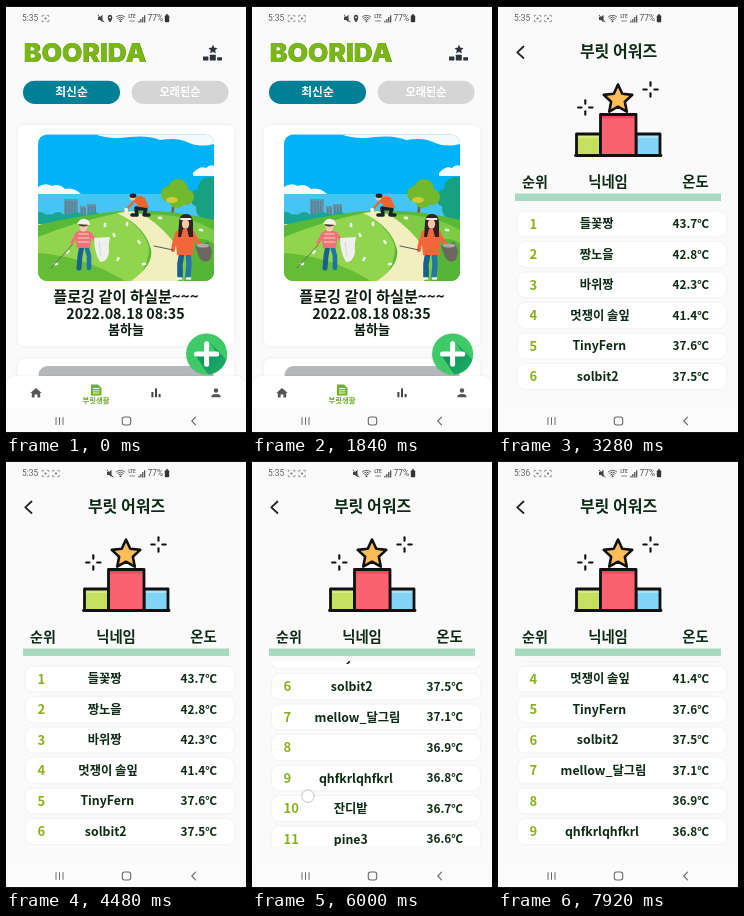
Recreate the animation shown at these times as an HTML page with a canvas. Size 240 by 427 pixels, loop 8000 ms.

```html
<!DOCTYPE html>
<html lang="ko">
<head>
<meta charset="utf-8">
<style>
html, body { margin: 0; width: 100%; height: 100%; overflow: hidden; background: #fafafa; }
canvas { display: block; width: 100vw; height: 100vh; }
</style>
</head>
<body>
<canvas id="stage"></canvas>
<script>
const W = 240, H = 427, LOOP = 8000;
const canvas = document.getElementById('stage');
const g = canvas.getContext('2d');
const FONT = '"Noto Sans CJK KR", "Noto Sans CJK", "Noto Sans", sans-serif';
const INK = '#0d2a14', DARK = '#2b333b', GREY = '#666a6e';

const ROWS = [
  ['들꽃짱', 43.7], ['짱노을', 42.8], ['바위짱', 42.3], ['멋쟁이 솔잎', 41.4],
  ['TinyFern', 37.6], ['solbit2', 37.5], ['mellow_달그림', 37.1], ['', 36.9],
  ['qhfkrlqhfkrl', 36.8], ['잔디밭', 36.7], ['pine3', 36.6], ['mellow_별이슬', 36.5],
  ['dewdrop', 36.5], ['cloud2', 36.5], ['ooo', 36.5], ['qhfkrl', 36.5],
  ['mellow_솔바람', 36.5], ['Moss', 36.5], ['mellow_은모래', 36.5]
];
const PITCH = 30.5;

// Each swipe: touch down, move start, rest time, distance, finger x and y
const SWIPES = [
  { down: 5040, from: 5120, to: 5840, dist: 142, x: 54, y: 335 },
  { down: 5920, from: 5960, to: 6720, dist: 256.5, x: 56, y: 338 },
  { down: 7200, from: 7240, to: 7920, dist: -307, x: 56, y: 232 }
];
const DRAG = 1 / 3;

const clamp = v => Math.max(0, Math.min(1, v));
const phase = (t, a, b) => clamp((t - a) / (b - a));

// Finger accelerates, then the list glides to rest
function glide(u) {
  const k = 27 / 7;
  if (u < DRAG) return k * u * u;
  return 1 - k * 4 / 27 * Math.pow((1 - u) / (1 - DRAG), 3);
}

function box(x, y, w, h, r, fill) {
  g.beginPath();
  g.roundRect(x, y, w, h, r);
  g.fillStyle = fill;
  g.fill();
}

function disc(x, y, rx, fill, ry = rx) {
  g.beginPath();
  g.ellipse(x, y, rx, ry, 0, 0, 7);
  g.fillStyle = fill;
  g.fill();
}

function line(pts, color, width, cap = 'round') {
  g.beginPath();
  for (let i = 0; i < pts.length; i += 2) g.lineTo(pts[i], pts[i + 1]);
  g.strokeStyle = color;
  g.lineWidth = width;
  g.lineCap = cap;
  g.lineJoin = 'round';
  g.stroke();
}

function shape(d, fill) {
  g.fillStyle = fill;
  g.fill(new Path2D(d));
}

function fade(x0, y0, x1, y1, from, to) {
  const f = g.createLinearGradient(x0, y0, x1, y1);
  f.addColorStop(0, from);
  f.addColorStop(1, to);
  return f;
}

// y is the visual middle of the line
function text(s, x, y, size, color, align = 'center', face = FONT, weight = 700) {
  g.font = `${weight} ${size}px ${face}`;
  g.textAlign = align;
  g.fillStyle = color;
  g.fillText(s, x, y + size * 0.365);
}

function shadowed(blur, alpha, draw) {
  g.save();
  g.shadowColor = `rgba(0,0,0,${alpha})`;
  g.shadowBlur = blur * canvas.width / W;
  draw();
  g.restore();
}

function star(x, y, r, fill, stroke, width) {
  g.beginPath();
  for (let i = 0; i < 10; i++) {
    const a = i * Math.PI / 5 - Math.PI / 2, q = i % 2 ? r * 0.48 : r;
    g.lineTo(x + q * Math.cos(a), y + q * Math.sin(a));
  }
  g.closePath();
  g.fillStyle = fill;
  g.fill();
  if (stroke) {
    g.strokeStyle = stroke;
    g.lineWidth = width;
    g.lineJoin = 'round';
    g.stroke();
  }
}

function captureIcon(x) {
  for (const sx of [-1, 1]) for (const sy of [-1, 1])
    line([x + sx * 3.3, 12.5 + sy * 1.6, x + sx * 3.3, 12.5 + sy * 3.2, x + sx * 1.6, 12.5 + sy * 3.2], '#777', 0.7);
  disc(x, 12.5, 1.1, '#777');
}

function statusBar(t) {
  const first = t < 2900;
  text(t < 7200 ? '5:35' : '5:36', 16, 12.3, 8.4, '#606060', 'left', 'Roboto, sans-serif', 400);
  captureIcon(39.5);
  if (t >= 160) captureIcon(50);
  const mx = first ? 95 : 104;
  shape(`M${mx - 3} 11h2l2.5-2.3v7.6l-2.5-2.3h-2z`, '#444');
  line([mx - 3, 9, mx + 3, 16], '#444', 0.9);
  if (first) {
    shape('M104 16.5C101 13 101 9 104 8.7C107 9 107 13 104 16.5Z', '#444');
    disc(104, 11.4, 0.9, '#fafafa');
  }
  g.strokeStyle = '#555';
  g.lineWidth = 0.9;
  for (const r of [2.5, 4.4, 6.3]) {
    g.beginPath();
    g.arc(114.5, 15.5, r, -2.3, -0.84);
    g.stroke();
  }
  disc(114.5, 15.2, 1, '#555');
  text('LTE', 126, 10.7, 4.6, '#555');
  line([123.5, 15, 128.5, 15], '#666', 0.8);
  for (let i = 0; i < 4; i++) box(132.3 + i * 1.9, 14.7 - i * 1.8, 1.3, 1.8 + i * 1.8, 0, '#555');
  text('77%', 141.5, 12.3, 8.4, '#4d4d4d', 'left', 'Roboto, sans-serif', 400);
  box(158.8, 9.3, 4.4, 7, 1, '#333');
  box(160, 8.3, 2, 1.2, 0, '#333');
}

function navBar() {
  box(0, 402, W, 25, 0, '#fbfbfb');
  for (const x of [50, 53.5, 57]) line([x, 411.5, x, 418.5], GREY, 1);
  g.beginPath();
  g.roundRect(116.3, 411, 8.4, 8, 2.2);
  g.strokeStyle = GREY;
  g.lineWidth = 1.1;
  g.stroke();
  line([189.5, 411.2, 185.8, 415, 189.5, 418.8], GREY, 1.1);
}

function bezel() {
  box(0, 0, W, 1, 0, '#111');
  box(0, H - 1, W, 1, 0, '#111');
}

function podiumIcon() {
  star(207, 43.5, 4.8, DARK);
  box(197, 50.5, 5.4, 4, 0.4, DARK);
  box(203.8, 48.8, 6, 5.7, 0.4, DARK);
  box(211.2, 51.2, 4.8, 3.3, 0.4, DARK);
}

function litter(x, y) {
  g.save();
  g.translate(x, y);
  g.rotate(x);
  box(-2.2, -1.3, 4.4, 2.6, 0.8, '#e4f3e4');
  g.restore();
}

function leftWalker() {
  line([76, 239, 74, 250, 73, 262], '#17608f', 5);
  line([80, 239, 83, 250, 83, 262], '#1f73a8', 4.6);
  shape('M69 227Q77 221 86 227L84 242L71 242Z', '#ee7378');
  for (const y of [228, 232, 236]) line([72, y, 83, y], '#f8cfcd', 1);
  line([71, 228, 66, 237], '#ee7378', 3.4);
  line([84, 228, 90, 235], '#ee7378', 3.2);
  line([66, 239, 45, 262], '#5d6a6c', 0.9);
  shape('M88 232L104 231Q102 239 103 247Q101 256 94 256Q88 246 88 232Z', '#f0f0ec');
  line([93, 236, 95, 250], '#cfd6d2', 0.9);
  disc(77.5, 221, 4, '#f6c9ae', 4.6);
  disc(77.5, 217.8, 4.9, '#4b3434', 2.6);
  shape('M71 218Q74 212 79 213Q84 214 84 219Z', '#f4efe8');
}

function crouchedWalker() {
  line([138, 203, 130, 202, 131, 209, 126, 209], '#18222c', 3.6);
  line([140, 203, 138, 209, 143, 209], '#18222c', 3.4);
  shape('M127 194Q133 187 139 192L143 202L133 201Z', '#f0642c');
  line([128, 195, 122, 202], '#f0642c', 2.4);
  disc(126.5, 191.5, 3, '#f5c3a2');
  disc(127, 189.8, 3.4, '#2d201f', 2.2);
  box(118.5, 202, 3.4, 4.5, 1, '#eef3ee');
}

function rightWalker() {
  line([176, 246, 174, 258, 174, 270], '#17618e', 5.6);
  line([182, 246, 183, 258, 182, 270], '#2277a8', 5.4);
  line([172, 272.5, 175, 272.5], '#f3f3ef', 2.4);
  line([181, 272.5, 184, 272.5], '#f3f3ef', 2.4);
  shape('M169 226Q179 219 189 226L187 249L171 249Z', '#f3653a');
  line([171, 228, 168, 238, 167, 244], '#f3653a', 4);
  line([187, 228, 192, 236, 196, 241], '#f3653a', 4);
  line([167, 244, 148, 240], '#4e5a5c', 1);
  shape('M189 240L202 236Q208 244 204 254Q197 258 193 251Z', '#6b6660');
  disc(197, 239.5, 6.5, '#a9aaa2', 2);
  shape('M173 217Q173 208 180 208Q187 208 187 217L187 231H183L181 223H177L175 231H172Z', '#30211f');
  disc(179.5, 218, 3.7, '#f6c3a3', 4.8);
  line([175, 213, 184.5, 213], '#f2eee7', 2);
}

function scene() {
  g.save();
  g.beginPath();
  g.roundRect(32, 128.5, 176, 146.5, 9);
  g.clip();
  box(32, 128, 176, 90, 0, '#00b2f6');
  // clouds
  shape('M88 128Q104 134 123 131Q143 129 154 134Q171 131 181 136Q193 142 208 138V128Z', '#f5fbfd');
  shape('M32 181Q39 176 46 180Q53 177 59 183Q68 181 76 189H32Z', '#f5fbfd');
  shape('M187 167Q194 159 200 162Q204 158 208 160V170H187Z', '#f5fbfd');
  box(32, 188, 176, 25, 0, '#45c5f4');
  // skyline
  for (const [x, y, w] of [[58, 193, 14], [74, 200, 6], [81, 198, 9]]) {
    box(x, y, w, 213 - y, 0, '#6794a8');
    for (let i = 2; i < w; i += 3) line([x + i, y + 2, x + i, 210], '#447a96', 1, 'butt');
  }
  // far bushes and trees
  for (let i = 0; i < 9; i++) disc(34 + i * 9, 212 + i % 2 * 2, 7, '#18a695', 6);
  for (const [x, y, r] of [[193, 192, 9], [204, 183, 12], [203, 202, 13]]) disc(x, y, r, '#17a181');
  line([168, 194, 166, 211], '#815e32', 2.6);
  for (const [x, y, r] of [[163, 188, 8], [172, 183, 10], [180, 191, 8], [171, 194, 8]]) disc(x, y, r, '#72b92d');
  disc(166, 194, 6, '#d2cc34', 3);
  // lawns and path
  shape('M32 219Q66 211 104 206Q154 201 208 214V275H32Z', '#57b936');
  shape('M32 231Q69 216 112 207Q137 221 143 241Q143 261 128 275H32Z', '#91d44e');
  shape('M32 247Q78 250 119 275H32Z', '#65bd35');
  shape('M111 207L126 205Q164 216 176 241Q180 260 172 275H125Q148 259 145 243Q139 220 111 207Z', '#f2eebd');
  shape('M138 209Q175 206 208 224V275H176Q184 240 138 209Z', '#80cb46');
  shape('M185 234Q201 231 208 238V275H178Z', '#55b536');
  for (const [x, y] of [[50, 258], [62, 246], [108, 229], [121, 218], [133, 236], [112, 253], [154, 212], [195, 224], [99, 219], [138, 258]])
    litter(x, y);
  leftWalker();
  crouchedWalker();
  rightWalker();
  g.restore();
}

function plusButton() {
  shadowed(2, 0.15, () => disc(200.6, 348, 20.5, '#3fca68'));
  g.save();
  g.beginPath();
  g.arc(200.6, 348, 20.5, 0, 7);
  g.clip();
  shape('M204 337L229 362V382H211L190 350H213Z', fade(200, 345, 217, 362, '#10945c', '#1dab66'));
  g.restore();
  line([190.5, 348, 210.8, 348], '#fff', 5);
  line([200.6, 337.8, 200.6, 358.2], '#fff', 5);
}

function tabs() {
  shadowed(2, 0.1, () => box(0, 370, W, 45, [9, 9, 0, 0], '#fff'));
  shape('M24.3 387L30 382L35.7 387H34.2V391.5H31.4V388.4H28.6V391.5H25.8V387Z', '#555');
  shape('M85 378.5H92L95.5 382V389.5H85Z', '#6cb421');
  for (const y of [382.5, 384.8, 387]) line([87, y, 93, y], '#fff', 0.9);
  text('부릿생활', 90, 394.2, 7.3, '#6aa821');
  box(145.4, 386, 2, 5.3, 0.4, '#444');
  box(149, 382.3, 2, 9, 0.4, '#444');
  box(152.6, 388, 2, 3.3, 0.4, '#444');
  disc(210, 384.5, 2.2, '#555');
  shape('M205.5 391.3V390Q206 388 210 388Q214 388 214.5 390V391.3Z', '#555');
}

function feedPage() {
  box(0, 0, W, H, 0, '#fafafa');
  const title = `Inter, ${FONT}`;
  text('BOORIDA', 18, 46.8, 26.4, '#55900f', 'left', title, 900);
  text('BOORIDA', 17.6, 46, 26.4, '#7ab51a', 'left', title, 900);
  podiumIcon();
  box(17, 74.7, 97, 23.3, 11.6, '#008097');
  box(125.7, 74.7, 96.8, 23.3, 11.6, '#d5d5d5');
  text('최신순', 65.5, 86, 11.8, '#fff');
  text('오래된순', 174, 86, 11.2, '#fff');
  shadowed(3, 0.09, () => {
    box(11.5, 119, 217, 221, 7, '#fff');
    box(11.5, 352.5, 217, 60, 7, '#fff');
  });
  scene();
  text('플로깅 같이 하실분~~~', 120, 290.5, 15.2, '#0d1d12');
  text('2022.08.18 08:35', 119.5, 307.5, 14.3, '#0d1d12');
  text('봄하늘', 120, 323.5, 13, '#0d1d12');
  box(32.5, 360, 175, 40, [9, 9, 0, 0], '#b5b8bb');
  plusButton();
  tabs();
}

function sparkle(x, y) {
  for (const [dx, dy] of [[1, 0], [-1, 0], [0, 1], [0, -1]])
    line([x + dx * 3.8, y + dy * 3.8, x + dx * 7.2, y + dy * 7.2], '#111', 2.1);
}

function trophy() {
  const step = (x, y, w, fill, light) => {
    box(x, y, w, 149.5 - y, 0, fill);
    box(x, y, w, 4, 0, light);
    g.strokeStyle = '#111';
    g.lineWidth = 2.8;
    g.lineJoin = 'round';
    g.strokeRect(x, y, w, 149.5 - y);
  };
  step(78.5, 128, 24, '#c6e05f', '#d6e983');
  step(138, 128, 24, '#83d3f7', '#a7e1fa');
  step(102.5, 108.5, 35.5, '#fb6270', '#e84a5f');
  line([77.5, 149.5, 163, 149.5], '#111', 2.8);
  star(120, 93.5, 15, '#ffbd57', '#111', 2.6);
  sparkle(87.3, 101.5);
  sparkle(152.5, 83.5);
}

function list(offset) {
  g.save();
  g.beginPath();
  g.rect(0, 200, W, 185);
  g.clip();
  ROWS.forEach(([name, temp], i) => {
    const y = 218 + i * PITCH - offset;
    if (y < 180 || y > 405) return;
    shadowed(2.5, 0.08, () => box(20, y - 12.5, 208, 25, 7, '#fff'));
    text(i + 1, 31.5, y, 13, '#86b01c', 'left');
    g.font = `700 12.3px ${FONT}`;
    text(name, 94.3 + 0.13 * g.measureText(name).width, y, 12.3, INK);
    text(temp.toFixed(1) + '℃', 211, y, 11.8, INK, 'right');
  });
  g.restore();
}

function awardPage(offset) {
  box(0, 0, W, H, 0, '#fafafa');
  line([25.5, 40.5, 19.3, 46.3, 25.5, 52], '#222', 1.8);
  text('부릿 어워즈', 120.5, 45, 16, INK);
  trophy();
  text('순위', 37, 175.5, 14, INK);
  text('닉네임', 110, 175.5, 14.4, INK);
  text('온도', 197.5, 175.5, 14.4, INK);
  box(17, 187.5, 206, 7.5, 0, '#a8dabf');
  list(offset);
}

function touch(x, y) {
  disc(x, y, 6.3, 'rgba(255,255,255,.72)');
  g.strokeStyle = '#b9bcc0';
  g.lineWidth = 0.9;
  g.stroke();
}

function render(t) {
  const scale = window.devicePixelRatio || 1;
  const w = Math.round(innerWidth * scale), h = Math.round(innerHeight * scale);
  if (canvas.width !== w || canvas.height !== h) { canvas.width = w; canvas.height = h; }
  g.setTransform(w / W, 0, 0, h / H, 0, 0);

  const offset = SWIPES.reduce((sum, s) => sum + s.dist * glide(phase(t, s.from, s.to)), 0);
  const enter = phase(t, 2760, 3000);
  if (enter < 1) feedPage();
  if (enter > 0) {
    g.save();
    g.globalAlpha = enter;
    g.translate(0, 24 * Math.pow(1 - enter, 3));
    awardPage(offset);
    g.restore();
  }
  statusBar(t);
  navBar();

  if (t >= 2640 && t < 2760) touch(203, 48.5);
  for (const s of SWIPES) {
    const u = phase(t, s.from, s.to);
    if (t >= s.down && u < DRAG) touch(s.x, s.y - s.dist * glide(u));
  }
  bezel();
}

const start = performance.now();
function tick() {
  render((performance.now() - start) % LOOP);
  requestAnimationFrame(tick);
}
tick();
</script>
</body>
</html>
```
